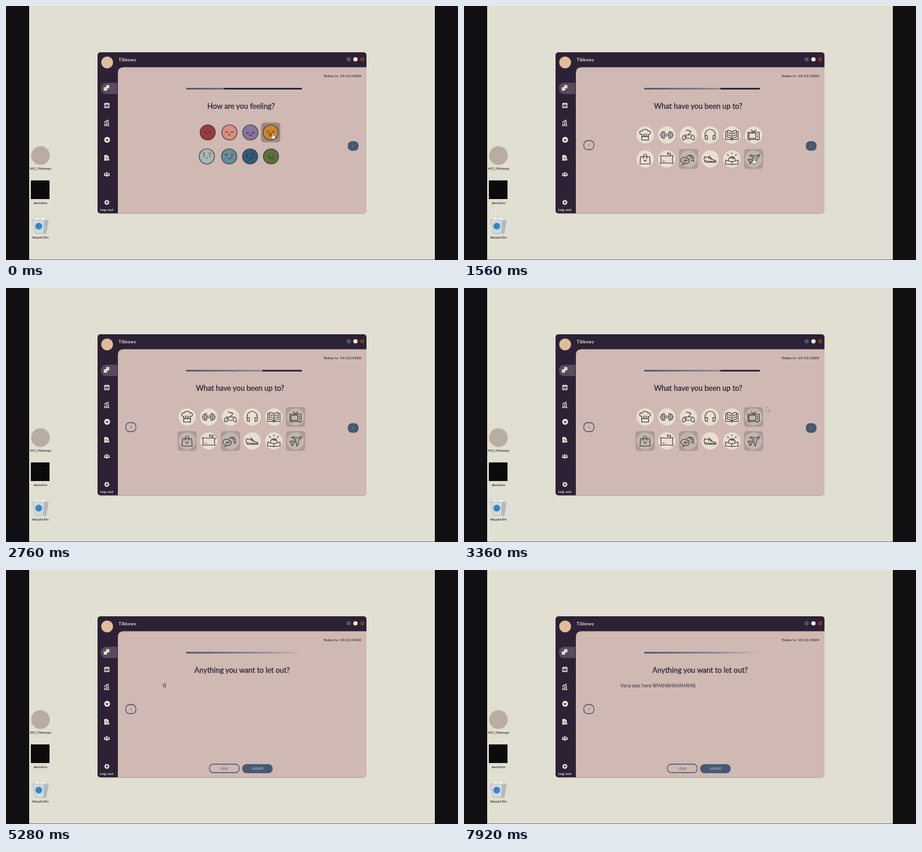
Write an HTML page that moves like this. It is 800x450 px and loops after 8 s.

```html
<!DOCTYPE html>
<html lang="en">
<head>
<meta charset="utf-8">
<title>Mood diary</title>
<style>
  html, body { margin: 0; width: 100%; height: 100%; overflow: hidden; background: #e0dfd1; }
  svg { display: block; width: 100vw; height: 100vh; }
  text { font-family: Lato, "Open Sans", sans-serif; fill: #2d2538; white-space: pre; }
  .title { font-size: 13px; text-anchor: middle; stroke: #2d2538; stroke-width: .3px; }
  .small { font-size: 6.2px; font-weight: 700; letter-spacing: .35px; }
  .label { font: 5.6px "Open Sans", sans-serif; text-anchor: middle; fill: #4b4944; stroke: #4b4944; stroke-width: .2px; }
  .button { font-size: 7px; text-anchor: middle; }
  .line { fill: none; stroke: #2d2635; stroke-width: 1.1; stroke-linejoin: round; stroke-linecap: round; }
  .side { fill: none; stroke: #eee4d6; stroke-width: 1.3; }
  .side .solid { fill: #eee4d6; stroke: none; }
  #typed { font: 8.1px "Open Sans", sans-serif; }
</style>
</head>
<body>
<svg viewBox="0 0 800 450" preserveAspectRatio="none">
  <defs>
    <linearGradient id="fade" gradientUnits="userSpaceOnUse" x1="319" x2="524" y1="0" y2="0">
      <stop stop-color="#4d5a70"/><stop offset=".6" stop-color="#8b8894"/><stop offset="1" stop-color="#cfb9b2"/>
    </linearGradient>
  </defs>

  <!-- desktop -->
  <rect width="800" height="450" fill="#e0dfd1"/>
  <rect y="449" width="800" height="1" fill="#77756f"/>
  <path d="M0 0H41V450H0ZM759 0H800V450H759Z" fill="#110f11"/>
  <circle cx="61" cy="265" r="16.5" fill="#b8aca3"/>
  <text class="label" x="61" y="290">VKO_Tibbowys</text>
  <rect x="44" y="309" width="33" height="33" fill="#0b0b0c"/>
  <text class="label" x="61" y="351">demoFox</text>
  <path d="M49 380L54 373 60 377 66 373 73 380Z" fill="#f5f6f5" stroke="#b4b8ba" stroke-width=".7"/>
  <path d="M47 379H75L71 403H52Z" fill="#d3d9dc" stroke="#a9b0b5" stroke-width=".8"/>
  <path d="M67 380H75L71 403H66Z" fill="#b2babf"/>
  <circle cx="58" cy="390" r="6" fill="#3586c4"/>
  <text class="label" x="61" y="412">Recycle Bin</text>

  <!-- window -->
  <rect x="162" y="82" width="476" height="285.5" rx="5" fill="#2d2135"/>
  <path d="M198 367.5V118.500Q198 108.500 208 108.500H638V362.500Q638 367.500 633 367.500Z" fill="#cfb9b2"/>
  <circle cx="179" cy="100" r="10.5" fill="#dfbd98"/>
  <text x="199.500" y="98" style="font-size:7.200px;font-weight:700;letter-spacing:.45px;fill:#f1e8dc">Tibbowy</text>
  <circle cx="606.500" cy="94.500" r="3.800" fill="#4d5670"/>
  <circle cx="618.500" cy="94.500" r="3.800" fill="#f3e9d9"/>
  <circle cx="630.500" cy="94.500" r="3.800" fill="#7c3422"/>
  <path d="M197 136H178Q168 136 168 146T178 156H197Z" fill="#594a5e"/>
  <g class="side">
    <g transform="translate(178 145)"><rect class="solid" x="-1" y="-5" width="6" height="6" rx="1.500"/><rect class="solid" x="-5" y="-1" width="6" height="6" rx="1.500"/><path d="M-3.500 1V2M-1 1V2M1-3V-2M3-3V-2" stroke="#594a5e" stroke-width=".8"/></g>
    <g transform="translate(178.500 176)"><path d="M-4-3H4V4H-4ZM-4-2H4M-2-5V-3M2-5V-3"/><path d="M-2.500 1H2.500M-2.500 3H2.500" stroke-dasharray="1 1"/></g>
    <g transform="translate(178.500 207)"><path d="M-3.500 5V1M-.5 5V-1M2.500 5V-3M-4.500-1L-1-3 3-5" stroke-width="1.500"/><path d="M-5 5H5" stroke-width="1"/></g>
    <g transform="translate(179 237)"><circle class="solid" r="5.200"/><path d="M-3-1.500L0 3 3-1.500 0-.5Z" fill="#2d2135" stroke="none"/></g>
    <g transform="translate(178 269)"><path class="solid" d="M-4-5H1L4-2V5H-4Z"/><path d="M-2-1H1M-2 1H0" stroke="#2d2135" stroke-width=".8"/><circle class="solid" cx="3" cy="3" r="2.300" style="stroke:#2d2135;stroke-width:.7"/></g>
    <g transform="translate(178.500 298)"><path class="solid" d="M-2 4V1Q0-1 2 1V4ZM-5 3V1Q-4-1-2.500 1V3ZM5 3V1Q4-1 2.500 1V3Z"/><circle class="solid" cy="-2" r="1.700"/><circle class="solid" cx="-3.500" cy="-1" r="1.200"/><circle class="solid" cx="3.500" cy="-1" r="1.200"/></g>
    <g transform="translate(178.500 348)"><circle r="2.700" stroke-width="2"/><circle r="4" stroke-width="1.300" stroke-dasharray="1.570"/></g>
  </g>
  <text class="small" x="166.500" y="363" style="fill:#f1e8dc">Log-out</text>
  <text class="small" x="562" y="126">Today Is: 13/12/2020</text>

  <rect x="319" y="145" width="205" height="3" rx="1.500" fill="#2d2540" id="track"/>
  <rect x="319" y="145" height="3" rx="1" fill="url(#fade)" id="bar"/>
  <text class="title" y="181.500" id="title"></text>

  <g id="moods"></g>
  <g id="activities"></g>
  <text x="528" y="317" id="hint" style="font-size:6.600px">ACTIVITES</text>

  <g id="prev"><rect x="212" y="238.500" width="18" height="16" rx="7" fill="none" stroke="#414c66" stroke-width="1.300"/><path class="line" d="M222 245L220.500 246.500 222 248" style="stroke-width:.7"/></g>
  <g id="next"><rect x="605" y="239.500" width="19" height="17" rx="7.500" fill="#445872"/><path class="line" d="M613.500 246.500L615 248 613.500 249.500" style="stroke:#aab0b8;stroke-width:.7"/></g>

  <g id="note">
    <rect x="360" y="344" width="53" height="15" rx="7" fill="none" stroke="#46536d" stroke-width="1.300"/>
    <text class="button" x="386.500" y="354" style="fill:#626475">clear</text>
    <rect x="418" y="344" width="54" height="16" rx="7.500" fill="#485873"/>
    <text class="button" x="445" y="354" style="fill:#c4bfc2">submit</text>
    <text x="277" y="207.500" id="typed"></text>
    <rect y="200.500" width=".7" height="8.500" fill="#2d2538" id="caret"/>
  </g>

  <g id="pointer" stroke="#4b4448" stroke-width=".6" stroke-linejoin="round" fill="#f7f2ec">
    <path id="arrow" d="M0 0V7.500L1.800 6 3 8.500 4.200 8 3.200 5.500H5.500Z"/>
    <path id="hand" d="M-1 0Q0-1 1 0V3.500L4.500 4.500Q5 8 3.500 9.500H-1L-3.500 5.500Q-3 4-1 5.500Z"/>
    <path id="beam" d="M-1.500-4H1.500M0-4V4M-1.500 4H1.500" stroke-width=".8"/>
  </g>
</svg>

<script>
const LOOP = 8000, STEP = 120;
const $ = id => document.getElementById(id);
const show = (el, on) => el.style.display = on ? '' : 'none';

// fill, x, y, features
const moods = [
  ['#993b3d', 357, 224, 'M-6-1L-3 0M6-1L3 0M-4 0V1M4 0V1M-1 3H1'],
  ['#d98d7e', 395.5, 224, 'M-7 0Q-5-2-3 0M7 0Q5-2 3 0M-1 3Q1 3 0 4Q1 5-1 5'],
  ['#86769d', 432.5, 224, 'M-7 0Q-5 2-3 0M7 0Q5 2 3 0M-2 5Q0 3 2 5'],
  ['#cb862f', 468.5, 224, 'M-7-1Q-5-3-3-1M7-1Q5-3 3-1M-3 2H3Q2 7 0 7T-3 2Z'],
  ['#abb5b5', 355.5, 266.5, 'M-5-2V0M5-2V0M-7-5L-4-6M7-5L4-6M-1 3H1'],
  ['#668f96', 395, 266.5, 'M-5-1V0M5-1V0M-7-3L-3-4M7-4L4-3M-1 4Q2 5 4 2'],
  ['#305a78', 432, 266.5, 'M-5-1V1M5-1V1M-7-2L-4-4M7-2L4-4M-2 4Q0 2 2 4'],
  ['#5b713c', 469, 266.5, 'M-6-1H-3M6-1H3M-4 3Q-2 1 0 3T4 3']
];

const activities = [
  'M-6 3V-1C-11-1-11-8-5-7-4-11 4-11 5-7 11-8 11-1 6-1V3ZM-6 3V9H6V3M-3 2V-2M0 2V-2M3 2V-2',
  'M-4-1.5H4V1.5H-4ZM-7-6H-4V6H-7ZM4-6H7V6H4ZM-10-4H-7V4H-10ZM7-4H10V4H7ZM-12 0H-10M10 0H12',
  'M-6 0H6C11 0 12 9 9 9 7 9 6 6 4 6H-4C-6 6-7 9-9 9-12 9-11 0-6 0ZM0 0C0-4 5-3 4-6S-3-7-4-9M-7 3H-3M-5 1V5M5 2V4M4 3H6',
  'M-9 4V-1A9 9 0 0 1 9-1V4M-9 1H-5V8H-7Q-10 7-9 1ZM9 1H5V8H7Q10 7 9 1Z',
  'M0-5Q-4-9-8-8V4Q-4 4 0 7 4 4 8 4V-8Q4-9 0-5V7M-8-6H-11V8H-2L0 9 2 8H11V-6H8M-6-4L-2-2M-6 0L-2 2M6-4L2-2M6 0L2 2',
  'M-10-5H10V8H-10ZM-8-3H4V6H-8ZM7-2V0M7 2V4M-4-9L0-5 4-9M-7 8V10M7 8V10',
  'M-8-4H8L9 9H-9ZM-3-1V-6Q0-11 3-6V-1M-2 2L0 4 2 2',
  'M-11-6Q0-4 11-6Q9 1 11 8Q0 6-11 8Q-9 1-11-6ZM1-11H3L1-8H3M5-10H7L5-7H7M-7 4H-4',
  'M-3-4A6 5 0 1 1 8 1L9 4 5 2M-4-2A6 5 0 1 0-8 7L-10 10-5 8A6 5 0 0 0-4-2ZM-8 2H-1M-8 4H-3M1-5H7M3-2H7',
  'M-10-4L-7-3Q-4-2-2-5L4 1 10 3V6H-8Q-12 3-10-4ZM-10 3Q-4 5 10 4M-3-1L0-3M0 1L2-1',
  'M-11 2L0 5 11 2V9L0 10-11 9ZM0 5V10M-6 2A6 6 0 1 1 6 2M-3-3L0-1 2-4 3 0M0-11V-9M-8-8L-6-6M8-8L6-6',
  'M-10 1L-7 0-4 1 1-2-7-6-5-7 5-5 9-8Q12-8 10-5L6-2 4 7 2 9 1 1-4 4-5 8-7 8-7 4Z'
].map((d, i) => [d, 320.5 + 38.4 * (i % 6), i < 6 ? 228.5 : 271]);

// activity index, shaded from, until
const shaded = [[9, 700, 840], [8, 840, LOOP], [11, 1500, LOOP], [5, 1980, LOOP], [6, 2760, LOOP]];

const at = (x, y, inner) => `<g transform="translate(${x} ${y})">${inner}</g>`;
const tile = (look, id = '') =>
  `<rect x="-17" y="-17.500" width="34" height="35" rx="5" ${look} ${id && `id="${id}"`}/>`;

$('moods').innerHTML = moods.map(([fill, x, y, d], i) => at(x, y,
  (i === 3 ? tile('fill="#9a8a86"') : '') +
  `<circle r="13.500" fill="${fill}" stroke="#3b3748" stroke-width="1.200"/><path class="line" d="${d}"/>`)).join('');

$('activities').innerHTML = activities.map(([d, x, y], i) => at(x, y,
  `<circle r="15.300" fill="#e9dfcf"/><path class="line" d="${d}"/>` +
  tile('fill="#4a3f40" fill-opacity=".25"', 'shade' + i))).join('');

const titles = [
  ['How are you feeling?', 416],
  ['What have you been up to?', 414.5],
  ['Anything you want to let out?', 418]
];
const message = 'Vena was here WHAHAHAHAHAHA';

// time, value...
const barEnd = [[510, 386], [1110, 454], [4080, 454], [4680, 524]];
const letters = [[5160, 0], [5280, 1], [6000, 9], [6480, 13], [6720, 13], [6840, 15], [7920, 27]];
const pointerPath = [
  [120, 472, 226], [480, 614, 247], [520, 614, 247], [600, 540, 252], [720, 413, 265],
  [960, 398, 269], [1080, 398, 269], [1560, 513, 270], [1800, 513, 270], [2040, 511, 228],
  [2400, 511, 228], [2880, 320, 270], [3120, 320, 270], [3240, 420, 240], [3360, 536, 211],
  [3480, 570, 225], [3840, 613, 247], [4080, 613, 247], [4440, 330, 215], [4680, 300, 206]
];

function sample(keys, t) {
  const i = keys.findIndex(k => k[0] > t);
  if (i === 0) return keys[0].slice(1);
  if (i < 0) return keys[keys.length - 1].slice(1);
  const a = keys[i - 1], b = keys[i], p = (t - a[0]) / (b[0] - a[0]);
  return a.slice(1).map((v, j) => v + (b[j + 1] - v) * p);
}

function render(t) {
  const page = t < 480 ? 0 : t < 4080 ? 1 : 2;
  $('title').textContent = titles[page][0];
  $('title').setAttribute('x', titles[page][1]);
  $('bar').setAttribute('width', sample(barEnd, t)[0] - 319);
  $('track').setAttribute('opacity', t < 4680 ? 1 : .45);

  show($('moods'), page === 0);
  show($('activities'), page === 1);
  show($('note'), page === 2);
  show($('prev'), page > 0);
  show($('next'), page < 2);
  show($('hint'), t >= 600 && t < 840);
  activities.forEach((_, i) =>
    show($('shade' + i), shaded.some(([n, from, to]) => n === i && t >= from && t < to)));

  const typed = $('typed');
  typed.textContent = message.slice(0, Math.floor(sample(letters, t)[0] + 1e-6));
  $('caret').setAttribute('x', 277 + (typed.textContent ? typed.getComputedTextLength() : 0));
  show($('caret'), t >= 4560);

  const [x, y] = sample(pointerPath, t);
  const targets = [...[moods, activities, []][page], ['', 614.5, 248]];
  const over = page < 2 && targets.some(([, cx, cy]) => Math.hypot(x - cx, y - cy) < 14);
  const writing = page === 2 && x < 500;
  $('pointer').setAttribute('transform', `translate(${x} ${y})`);
  show($('pointer'), t < 5280);
  show($('hand'), over);
  show($('beam'), writing);
  show($('arrow'), !over && !writing);
}

const start = performance.now();
function tick() {
  const t = (performance.now() - start) % LOOP;
  render(Math.floor(t / STEP) * STEP);
  requestAnimationFrame(tick);
}
tick();
</script>
</body>
</html>
```
